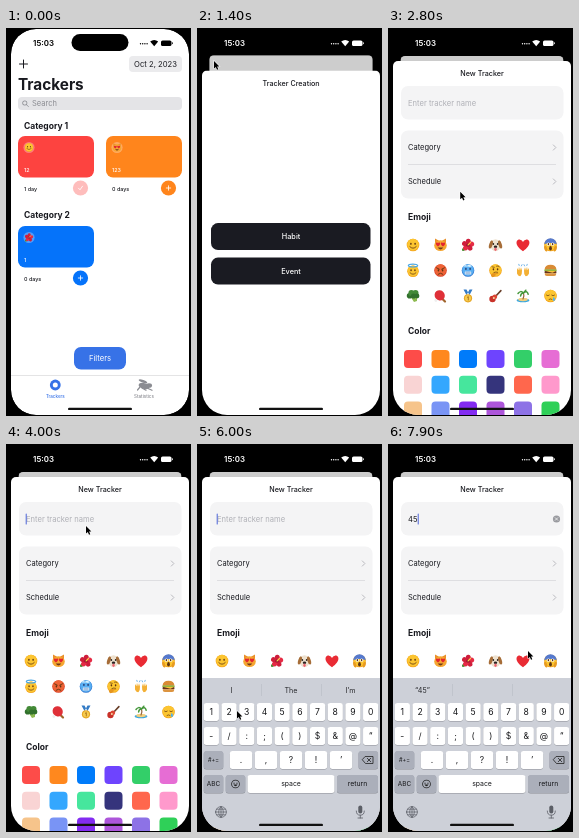
Animation of 185x388 px, one loop 8 s. Source, as an HTML page with a canvas:

```html
<!DOCTYPE html>
<html lang="en">
<head>
<meta charset="utf-8">
<title>Habit tracker demo</title>
<style>
html, body { margin: 0; width: 100%; height: 100%; overflow: hidden; background: #000; }
canvas { display: block; width: 185px; height: 388px; }
</style>
</head>
<body>
<canvas></canvas>
<script>
const W = 185, H = 388, LOOP = 8000, STEP = 100;
const INK = '#18191f', GRAY = '#8b8c92', BLUE = '#3772e7', BROWN = '#5f3511';
const canvas = document.querySelector('canvas');
const ctx = canvas.getContext('2d');
const ratio = window.devicePixelRatio || 1;
canvas.width = W * ratio;
canvas.height = H * ratio;

// Drawing helpers
function box(x, y, w, h, r, color) {
  ctx.fillStyle = color;
  ctx.beginPath();
  ctx.roundRect(x, y, w, h, r);
  ctx.fill();
}
function oval(x, y, rx, ry, color, turn = 0) {
  ctx.fillStyle = color;
  ctx.beginPath();
  ctx.ellipse(x, y, rx, ry, turn, 0, Math.PI * 2);
  ctx.fill();
}
const disc = (x, y, r, color) => oval(x, y, r, r, color);
function shape(d, color) {
  ctx.fillStyle = color;
  ctx.fill(new Path2D(d));
}
function line(d, color, width = 0.8) {
  ctx.strokeStyle = color;
  ctx.lineWidth = width;
  ctx.lineCap = ctx.lineJoin = 'round';
  ctx.stroke(new Path2D(d));
}
function text(str, x, y, size, color = INK, weight = 400, align = 'left') {
  ctx.font = `${weight} ${size}px Inter, Roboto, sans-serif`;
  ctx.textAlign = align;
  ctx.fillStyle = color;
  ctx.fillText(str, x, y);
}
const label = (str, x, y, size, color, weight) => text(str, x, y, size, color, weight, 'center');
function at(x, y, scale, draw) {
  ctx.save();
  ctx.translate(x, y);
  ctx.scale(scale, scale);
  draw();
  ctx.restore();
}
function clipped(x, y, w, h, r, draw) {
  ctx.save();
  ctx.beginPath();
  ctx.roundRect(x, y, w, h, r);
  ctx.clip();
  draw();
  ctx.restore();
}
function faded(alpha, draw) {
  ctx.save();
  ctx.globalAlpha *= alpha;
  draw();
  ctx.restore();
}

// Timing helpers
const clamp = v => Math.max(0, Math.min(1, v));
const easeOut = (t, start, duration) => 1 - (1 - clamp((t - start) / duration)) ** 3;
const mix = (a, b, p) => a + (b - a) * p;

// Emoji, each within about 6.5 px of its centre
function face(color = '#fcc530', edge = '#f3a51f') {
  disc(0, 0, 6.3, edge);
  disc(0, -0.4, 5.8, color);
}
function eyes(y = -1.2, color = BROWN) {
  oval(-2.1, y, 0.8, 1.1, color);
  oval(2.1, y, 0.8, 1.1, color);
}
const smile = () => line('M-3.2 1.6Q0 5 3.2 1.6', BROWN);
const HEART = 'M0 5.5C-9 -.5-6-6-2.7-5.2Q-.7-4.7 0-3Q.7-4.7 2.7-5.2C6-6 9-.5 0 5.5Z';
const emoji = {
  smile() { face(); eyes(); smile(); },
  cat() {
    shape('M-5.5 0L-5.5-6.5L-1-4ZM5.5 0L5.5-6.5L1-4Z', '#e9902a');
    oval(0, 0.6, 6.3, 5.4, '#f5a631');
    for (const x of [-2.5, 2.5]) at(x, -0.6, 0.36, () => shape(HEART, '#e3252f'));
    shape('M-2.8 2.4H2.8Q0 6.4-2.8 2.4Z', '#713b16');
  },
  flower() {
    oval(-3.6, 3.8, 2.8, 1.6, '#4b8e35', -0.6);
    for (let i = 0; i < 5; i++) {
      const a = i * Math.PI * 0.4 - 1.5;
      oval(Math.cos(a) * 3.3, Math.sin(a) * 3.3, 3, 2.5, i % 2 ? '#e52b45' : '#cf1e3b', a);
    }
    disc(0, 0, 1.6, '#860f2c');
    line('M0 0L2.6-2.6', '#ffd34c', 1.1);
  },
  dog() {
    oval(0, 0.2, 5, 6, '#eee2d0');
    oval(-4.6, -0.6, 1.7, 4.2, '#a66d38', 0.3);
    oval(4.6, -0.6, 1.7, 4.2, '#a66d38', -0.3);
    eyes(-1, '#292321');
    oval(0, 1.7, 1.7, 1.2, '#292321');
    oval(0, 4.3, 1.2, 1.7, '#ec6572');
  },
  heart() { at(0, 0.3, 1.08, () => shape(HEART, '#e92b34')); },
  scream() {
    face();
    shape('M-6.2-.8A6.2 6 0 0 1 6.2-.8Q0-3-6.2-.8Z', '#5579ce');
    disc(-2.1, -0.8, 1.6, '#fff');
    disc(2.1, -0.8, 1.6, '#fff');
    eyes(-0.8);
    oval(0, 3.2, 1.4, 2.2, BROWN);
    oval(-4.8, 3.6, 1.5, 3, '#e89b20', -0.3);
    oval(4.8, 3.6, 1.5, 3, '#e89b20', 0.3);
  },
  angel() {
    at(0, 0.8, 0.92, () => { face(); eyes(); smile(); });
    ctx.strokeStyle = '#4ba8e5';
    ctx.lineWidth = 1.2;
    ctx.beginPath();
    ctx.ellipse(0, -4.9, 4.7, 1.4, 0, 0, Math.PI * 2);
    ctx.stroke();
  },
  angry() {
    face('#ee6336', '#d83f26');
    eyes(-0.1);
    line('M-4-2.7L-1.2-1.3M4-2.7L1.2-1.3M-2.4 3.7Q0 1.6 2.4 3.7', BROWN, 0.9);
  },
  cold() {
    face('#58aef2', '#3278d0');
    eyes(-1.6, '#263a70');
    box(-3.2, 1.1, 6.4, 2.8, 1, '#e9f4ff');
    line('M-3 2.5H3M-1 1.2V3.8M1 1.2V3.8', '#356bab', 0.4);
    shape('M-5-4L-3-5.4L-1-4.8L1-6L4-4.4L2-3.6L0-4Z', '#d5f1ff');
  },
  thinking() {
    face();
    eyes();
    line('M-3.5-3.7L-1.2-3.2M1-4.4Q2.6-5.2 3.8-3.8M-1.6 2Q.4 1 2.2 1.8', BROWN, 0.7);
    oval(-2.2, 4.6, 2.4, 1.9, '#e6951f', -0.4);
    line('M-1.2 3.6L2.2 2.8', '#e6951f', 1.3);
  },
  hands() {
    for (const side of [-1, 1]) {
      ctx.save();
      ctx.scale(side, 1);
      shape('M1 0L2-3.2L3 0L4-3.8L4.6-.2L6-2.6L6 3Q5 6 2.4 5.6Q.8 4 1 0Z', '#f3b035');
      line('M1-5.8L1.6-4.6M4.2-6.2L3.8-5', '#4d9fe0', 0.8);
      ctx.restore();
    }
  },
  burger() {
    shape('M-6-.8Q-5.6-5.8 0-5.8Q5.6-5.8 6-.8Z', '#d98b35');
    box(-6.2, -0.9, 12.4, 1.7, 0.8, '#75b13b');
    box(-6, 0.5, 12, 2.3, 1, '#65331e');
    shape('M-6 .3H6L2 2.3Z', '#f8c439');
    box(-5.8, 2.7, 11.6, 2.8, [0.5, 0.5, 2.2, 2.2], '#dc9440');
  },
  broccoli() {
    shape('M-3 0L1 6L4 5L4-1Z', '#8dba50');
    for (const [x, y, r] of [[-3.4, -0.3, 2.8], [-1.6, -3, 3], [2.5, -3, 3], [4, 0, 2.4], [0.5, 0, 2.6]])
      disc(x, y, r, y < -1 ? '#438a37' : '#32712c');
  },
  paddle() {
    line('M1 2L4.5 5.5', '#a1652d', 2.2);
    oval(-0.8, -0.6, 5, 5.3, '#df3038', -0.7);
    disc(-4.6, 4.5, 1.4, '#eeeeee');
  },
  medal() {
    shape('M-4.5-6.5H-1.5L2 0H-1ZM4.5-6.5H1.5L-2 0H1Z', '#337bc5');
    disc(0, 2.3, 4.1, '#e5a625');
    disc(0, 2.3, 3, '#f8cd50');
    line('M-.7 1.3L.3.6V4', '#9b6312', 0.8);
  },
  guitar() {
    line('M-1 1.5L5.4-5.4', '#69402a', 1.6);
    disc(-3, 3, 3.2, '#c93229');
    disc(-0.6, 0.7, 2.3, '#dc4633');
    disc(-1.7, 1.9, 1, '#f3d6a2');
  },
  island() {
    oval(0, 4.4, 6.4, 1.9, '#3ea8df');
    oval(0, 3.5, 4.8, 1.7, '#f2cf7d');
    line('M0 3Q1.5 0 .5-3', '#94643a', 1.2);
    line('M.5-3Q-2.5-6-5-2.5M.5-3Q4-6 5.2-1.8M.5-3Q-2-3-2.4 0M.5-3L2.8-5.8', '#46983c', 1.5);
  },
  sleepy() {
    face();
    line('M-4-.8Q-2.5.5-1.2-.8M1.2-.8Q2.5.5 4-.8M-1.5 3.4Q0 2.2 1.5 3.4', BROWN, 0.7);
    shape('M3.2 .8Q6 4.6 3.2 5Q1.4 4.6 3.2.8Z', '#4fb2ef');
  }
};
const emojiList = Object.values(emoji);

const swatches = `fd4c49 ff881e 007bfa 6e44fe 33cf69 e66dd4
  f9d4d4 34a7fe 46e69d 35347c ff674d ff99cc
  f6c48b 7994f5 832cf1 ad56da 8d72e6 2fd058`.split(/\s+/).map(c => '#' + c);

// Screens
function trackerCard(x, y, color, icon, name, days, done) {
  box(x, y, 76, 41.5, 7, color);
  disc(x + 11, y + 11.5, 5.6, 'rgba(255,255,255,.3)');
  at(x + 11, y + 11.5, 0.68, icon);
  text(name, x + 6, y + 36, 5.4, '#fff', 500);
  text(days, x + 6, y + 54.5, 5.4, INK, 500);
  faded(done ? 0.35 : 1, () => disc(x + 62.5, y + 52, 7.6, color));
  at(x + 62.5, y + 52, 1, () =>
    line(done ? 'M-2 .2L-.5 1.8L2-1.8' : 'M-2.2 0H2.2M0-2.2V2.2', '#fff', 0.8));
}

function trackersScreen() {
  box(5, 1, 178, 386, 0, '#fff');
  line('M13.5 36H21.5M17.5 32V40', INK, 1);
  box(123, 28, 53, 16, 4, '#ebebed');
  label('Oct 2, 2023', 149.5, 38.8, 7.7);
  text('Trackers', 12, 62, 15.3, INK, 700);
  box(12, 69, 164, 13, 4, '#e4e4e7');
  disc(18.8, 75, 2.5, GRAY);
  disc(18.8, 75, 1.8, '#e4e4e7');
  line('M20.6 76.8L22.4 78.6', GRAY);
  text('Search', 26, 78.2, 7.5, GRAY);
  text('Category 1', 18, 100.5, 8.5, INK, 700);
  trackerCard(12, 108, '#fd4340', emoji.smile, '12', '1 day', true);
  trackerCard(100, 108, '#ff851c', emoji.cat, '123', '0 days');
  text('Category 2', 18, 189.5, 8.5, INK, 700);
  trackerCard(12, 198, '#0573fa', emoji.flower, '1', '0 days');
  box(68, 319, 52, 22.5, 7, BLUE);
  label('Filters', 94, 333, 7.7, '#fff');
  box(5, 347.5, 178, 0.5, 0, '#c9c9cc');
  disc(49.3, 357, 5.4, BLUE);
  disc(49.3, 357, 2.5, '#fff');
  label('Trackers', 49.3, 370, 4.5, BLUE, 500);
  oval(138, 358, 5.5, 2.9, GRAY, 0.25);
  oval(143, 357.5, 3, 2.3, GRAY);
  oval(137, 353.3, 4.5, 1.3, GRAY, 0.35);
  line('M134 359L131.5 362M141 360L146 362.3M136 360L140 362.3', GRAY, 1.2);
  label('Statistics', 138, 370, 4.5, GRAY, 500);
}

const sheetTitle = (str, x, alpha) =>
  faded(alpha, () => label(str, x, 48, 7.2, INK, 500));

function creationPage(titleAlpha) {
  box(5, 33, 178, 355, 0, '#fff');
  sheetTitle('Tracker Creation', 94, titleAlpha);
  ['Habit', 'Event'].forEach((name, i) => {
    box(14, 185.5 + i * 34.5, 159.5, 27, 7, '#1a1b22');
    label(name, 94, 201.7 + i * 34.5, 7.3, '#fff', 500);
  });
}

function formPage(t) {
  box(5, 33, 178, 355, 0, '#fff');
  box(13, 58, 162.5, 33.5, 7, '#f4f4f5');
  const typed = t < 6600 ? '' : t < 7300 ? '4' : '45';
  text(typed || 'Enter tracker name', 20, 77.8, 7.6, typed ? INK : '#b0b1b7');
  const caretX = 19.7 + (typed ? ctx.measureText(typed).width + 0.6 : 0);
  if (t >= 4000 && (typed || t % 1000 < 550)) box(caretX, 69.5, 1, 11, 0.5, '#4b63d9');
  if (typed) {
    disc(168.5, 75, 3.6, '#9a9ba0');
    line('M167.2 73.7L169.8 76.3M169.8 73.7L167.2 76.3', '#fff', 0.7);
  }
  box(13, 102.5, 162.5, 68, 7, '#f4f4f5');
  box(20, 136, 148, 0.5, 0, '#c9c9cd');
  ['Category', 'Schedule'].forEach((name, i) => {
    const y = 119.5 + i * 34;
    text(name, 20, y + 2.8, 7.5);
    line(`M165.3 ${y - 2.6}L167.9 ${y}L165.3 ${y + 2.6}`, '#b4b4b9', 0.9);
  });
  text('Emoji', 20, 192, 8.5, INK, 700);
  text('Color', 20, 306, 8.5, INK, 700);
  for (let i = 0; i < 18; i++) {
    const x = 25 + (i % 6) * 27.5, row = Math.floor(i / 6);
    at(x, 217 + row * 25.5, 1, emojiList[i]);
    box(x - 9, 322 + row * 25.7, 18, 18, 4, swatches[i]);
  }
}

function sheet(t) {
  const p = easeOut(t, 2200, 500);
  clipped(5, 33, 178, 380, 5, () => {
    if (p < 1) {
      at(-53 * p, 0, 1, () => creationPage(p ? 0 : 1));
      box(5, 33, 178, 355, 0, `rgba(0,0,0,${0.13 * p})`);
    }
    if (p > 0) {
      at(178 * (1 - p), 0, 1, () => formPage(t));
      if (p < 1) sheetTitle('Tracker Creation', 94, (1 - p) * 0.4);
      sheetTitle('New Tracker', 94 + 116 * (1 - p), p);
    }
  });
}

// Keyboard
function key(str, x, y, w, dark, size = 8.6) {
  box(x - w / 2, y - 8.4, w, 18, 2.5, '#898c93');
  box(x - w / 2, y - 9, w, 18, 2.5, dark ? '#abafba' : '#fff');
  label(str, x, y + size * 0.36, size, '#16171a');
}
function keyRow(chars, y, pitch, w) {
  [...chars].forEach((c, i) =>
    key(c, 94 + (i - (chars.length - 1) / 2) * pitch, y, w));
}
function keyboard(t) {
  const numeric = t >= 4900;
  const hints = t < 6600 ? ['I', 'The', 'I’m'] : [t < 7500 ? '“4”' : '“45”'];
  box(5, 234, 178, 154, 0, '#cdd0d8');
  hints.forEach((hint, i) => label(hint, 34.5 + i * 59.5, 248.5, 7.2, '#2a2b2f'));
  box(64, 240, 0.5, 12, 0, '#b4b7bf');
  box(124, 240, 0.5, 12, 0, '#b4b7bf');
  keyRow(numeric ? '1234567890' : 'QWERTYUIOP', 268, 17.7, 15.2);
  keyRow(numeric ? '-/:;()$&@“' : 'ASDFGHJKL', 292, 17.7, 15.2);
  if (numeric) {
    keyRow('.,?!’', 316, 25, 22.3);
    key('#+=', 16.5, 316, 19.5, true, 5.6);
  } else {
    keyRow('ZXCVBNM', 316, 17.7, 15.2);
    key('', 16.5, 316, 19.5);
    shape('M16.5 311.5L21 316H18.7V320H14.3V316H12Z', '#111');
  }
  key('', 171.3, 316, 19.5, true);
  line('M168.5 312.5H176V319.5H168.5L165.5 316ZM170.3 314.3L173.7 317.7M173.7 314.3L170.3 317.7', '#222', 0.8);
  key(numeric ? 'ABC' : '123', 16.5, 340, 19.5, true, 6.4);
  key('', 38.5, 340, 19.5, true);
  disc(38.5, 340, 4.3, '#222');
  disc(38.5, 340, 3.5, '#abafba');
  at(38.5, 340, 0.7, () => {
    eyes(-1.2, '#222');
    shape('M-3 .8H3Q0 5.6-3 .8Z', '#222');
  });
  key('space', 94, 340, 87, false, 6.9);
  key('return', 160.5, 340, 41, true, 6.9);
  at(24, 368, 1, () =>
    line('M-5.4 0A5.4 5.4 0 1 1 5.4 0A5.4 5.4 0 1 1-5.4 0ZM-5.4 0H5.4M0-5.4V5.4M-4.5-2.8H4.5M-4.5 2.8H4.5M0-5.4Q-5 0 0 5.4Q5 0 0-5.4', '#5b5e66', 0.7));
  box(161.3, 361.5, 4, 8, 2, '#5b5e66');
  line('M159.3 367Q159.3 371.2 163.3 371.2Q167.3 371.2 167.3 367M163.3 371.2V374M161 374H165.6', '#5b5e66', 0.8);
}

function statusBar(color) {
  box(65.5, 6, 57, 17, 8.5, '#000');
  label('15:03', 37.5, 18, 7.9, color, 600);
  for (let i = 0; i < 4; i++) disc(134.5 + i * 2.2, 15.7, 0.7, color);
  shape('M144.2 13.6Q148.2 10.4 152.2 13.6L148.2 18.2Z', color);
  box(155, 12.4, 10.5, 5.6, 1.6, color);
  box(166, 14.2, 0.8, 2, 0.4, color);
}

// Pointer stops: time, x, y
const pointerStops = [
  [400, 32, -10], [900, 17, 33], [1500, 17, 33], [2100, 68, 208], [2600, 68, 208],
  [3100, 80, 82], [4050, 80, 82], [4500, 67, 313], [4850, 15, 341], [5200, 15, 341],
  [6000, 40, 267], [6400, 65, 265], [6700, 65, 265], [7100, 84, 265], [7300, 84, 265],
  [7850, 140, 207], [LOOP, 140, 207]
];
function pointer(t) {
  const i = pointerStops.findIndex(stop => stop[0] > t);
  if (i < 1) return;
  const [t0, x0, y0] = pointerStops[i - 1], [t1, x1, y1] = pointerStops[i];
  const u = (t - t0) / (t1 - t0), p = u * u * (3 - 2 * u);
  at(mix(x0, x1, p), mix(y0, y1, p), 1, () => {
    const arrow = 'M0 0V7.6L1.8 6L3 8.8L4.3 8.2L3.1 5.5H5.4Z';
    line(arrow, '#fff', 0.9);
    shape(arrow, '#000');
  });
}

function render(t) {
  const rise = easeOut(t, 1050, 500);
  const keys = easeOut(t, 4000, 450);
  ctx.setTransform(ratio, 0, 0, ratio, 0, 0);
  box(0, 0, W, H, 0, '#000');
  clipped(5, 1, 178, 386, 25, () => {
    const scale = 1 - 0.084 * rise;
    at(94 * (1 - scale), 1 + 27 * rise - scale, scale, () =>
      clipped(5, 1, 178, 386, rise ? 5 : 25, () => {
        trackersScreen();
        box(5, 1, 178, 386, 0, `rgba(0,0,0,${0.2 * rise})`);
      }));
    if (rise) at(0, 355 * (1 - rise), 1, () => sheet(t));
    if (keys) at(0, 154 * (1 - keys), 1, () => keyboard(t));
    statusBar(rise > 0.3 ? '#fff' : '#000');
    box(62, 379.7, 64, 2.4, 1.2, '#111');
  });
  pointer(t);
}

function frame() {
  render(Math.floor(performance.now() % LOOP / STEP) * STEP);
  requestAnimationFrame(frame);
}
frame();
</script>
</body>
</html>
```
